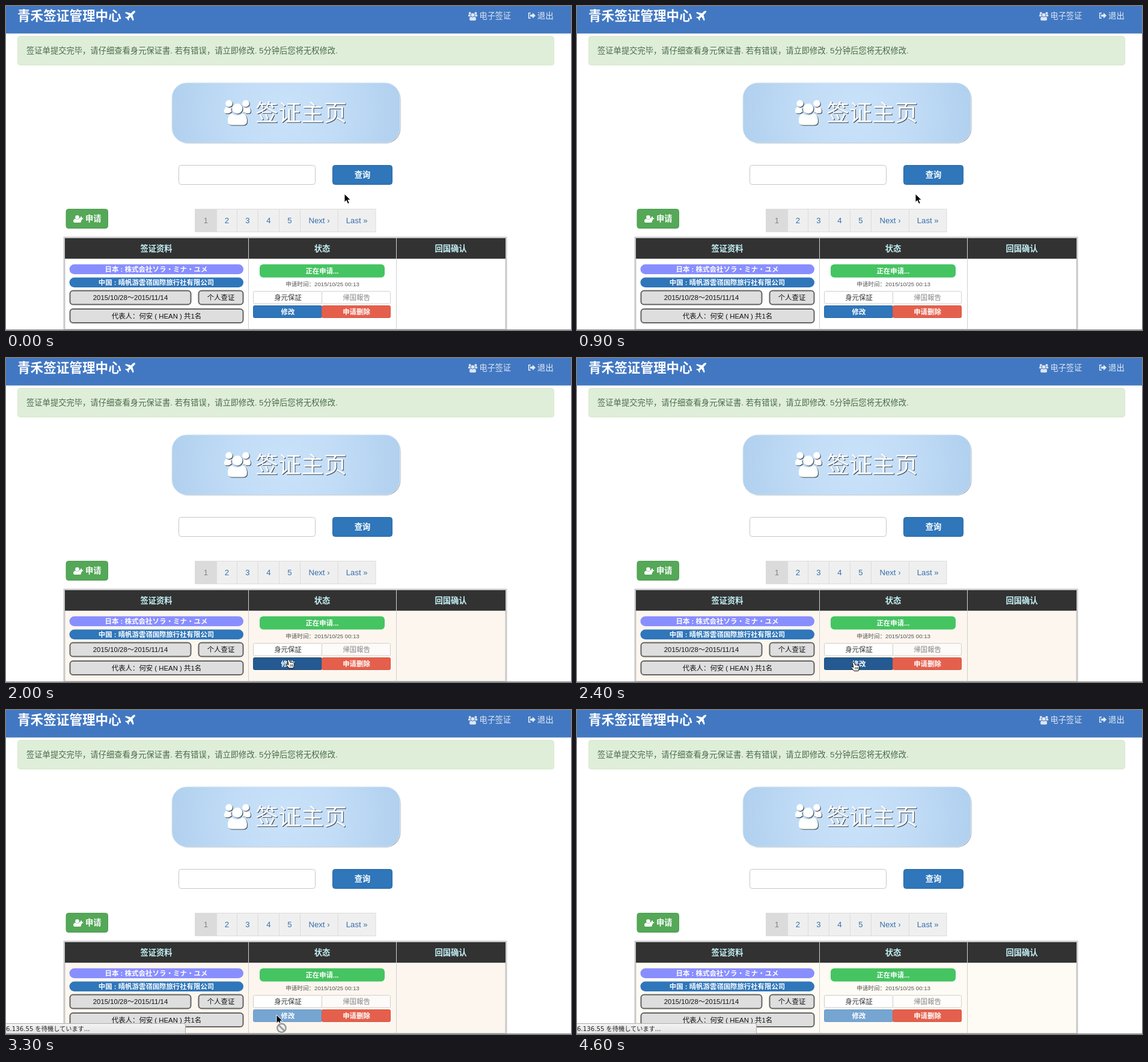
These frames come from a looping animation (940x540 px, 4.7 s). An HTML page:

```html
<!DOCTYPE html>
<html lang="zh">
<head>
<meta charset="utf-8">
<title>签证管理中心</title>
<style>
  html, body { margin: 0; width: 100%; height: 100%; overflow: hidden; background: #fff; }
  svg { display: block; width: 940px; height: 540px; }
  text { font-family: "Liberation Sans", "Noto Sans CJK SC", "Noto Sans CJK JP", "Noto Sans CJK", sans-serif; white-space: pre; }
  .jp { font-family: "Liberation Sans", "Noto Sans CJK JP", "Noto Sans CJK", sans-serif; }
  .mono { font-family: "DejaVu Sans", "Noto Sans CJK JP", "Noto Sans CJK", sans-serif; }
  .raised { filter: drop-shadow(1.5px 1.5px .7px #3c444d); }
</style>
</head>
<body>
<svg id="stage" viewBox="0 0 940 540" xmlns="http://www.w3.org/2000/svg">
  <defs>
    <radialGradient id="sky" gradientUnits="userSpaceOnUse" cx="465.500" cy="178" r="196">
      <stop offset="0" stop-color="#c9e2fa"/>
      <stop offset=".4" stop-color="#c3ddf7"/>
      <stop offset="1" stop-color="#b0d0ee"/>
    </radialGradient>
    <linearGradient id="bar" x2="0" y2="1">
      <stop offset="0" stop-color="#f4f4f4"/>
      <stop offset="1" stop-color="#e2e2e2"/>
    </linearGradient>
    <g id="users">
      <circle cx="8" cy="7" r="5.800"/>
      <circle cx="36" cy="7" r="5.800"/>
      <path d="M4 13C1 13 0 17 0 20Q0 23.500 4 23.500H8Q10 21.500 12.500 21Q11 17 11.800 14Q8 16 4 13Z"/>
      <path d="M40 13C43 13 44 17 44 20Q44 23.500 40 23.500H36Q34 21.500 31.500 21Q33 17 32.200 14Q36 16 40 13Z"/>
      <circle cx="22" cy="15.500" r="8.500"/>
      <path d="M13.500 24C7.500 24 6 31 6 36Q6 43 12.500 43H31.500Q38 43 38 36C38 31 36.500 24 30.500 24Q22 30 13.500 24Z"/>
    </g>
    <path id="plane" d="M17 .4C15.500 -.4 13.600 .5 12.300 1.800L9.900 4.200L1.600 2L0 3.600L6.700 7.400L3.600 10.600L1.200 10.100L.2 11.100L3.500 13.100L5.600 16.500L6.600 15.500L6.100 13.100L9.300 10L13.100 16.700L14.700 15.100L12.500 6.800L14.900 4.400C16.200 3.100 17.500 1.500 17 .4Z"/>
  </defs>
  <g id="page"></g>
  <g id="status">
    <path d="M-1 522.500H296Q298.500 522.500 298.500 525V541H-1Z" fill="url(#bar)" stroke="#adadad"/>
    <text id="statusText" class="mono" x="0" y="534.500" font-size="10.200" fill="#222"></text>
  </g>
  <g id="cursor">
    <path id="arrow" d="M0 0V14.200L3.300 11.200L5.700 16.700L8.300 15.600L5.900 10.200H10.300Z" fill="#000" stroke="#fff" stroke-width="1"/>
    <g id="hand" stroke="#000" stroke-width="1" stroke-linejoin="round">
      <path d="M-1.500 1Q0 -1 1.500 1L3 5Q4.500 3.800 5.500 5.200Q7 4.200 8 5.700Q9.600 5.200 9.800 7L9.500 11L8 14.500H1L-2 11L-4 8.500Q-3.800 6.500 -1.500 8L-.2 9Z" fill="#fff"/>
      <path d="M3 8V12M5.300 8V12M7.400 8V12" fill="none" stroke-width=".8"/>
    </g>
    <g id="blocked" fill="none">
      <circle cx="8.500" cy="22" r="7.300" stroke="#fff" stroke-width="4.500"/>
      <circle cx="8.500" cy="22" r="7.200" fill="#f2f0ee" stroke="#999" stroke-width="2.500"/>
      <path d="M3.500 17L13.500 27" stroke="#999" stroke-width="2.500"/>
    </g>
  </g>
  <path d="M0 539.500H940" stroke="#8c8c8c"/>
</svg>
<script>
const $ = id => document.getElementById(id);
const parts = [];

const box = (x, y, w, h, fill, stroke = 'none', r = 0, extra = '') =>
  parts.push(`<rect x="${x}" y="${y}" width="${w}" height="${h}" rx="${r}" fill="${fill}" stroke="${stroke}" ${extra}/>`);

// Text is placed by the vertical middle of its line.
const label = (str, x, mid, size, fill, opt = '') =>
  parts.push(`<text x="${x}" y="${mid + size * .37}" font-size="${size}" fill="${fill}" ${opt}>${str}</text>`);
const MID = 'text-anchor="middle"';
const BOLD = 'font-weight="bold"';
const MIDBOLD = `${MID} ${BOLD}`;

const icon = (id, x, y, scale, fill, opt = '') =>
  parts.push(`<use href="#${id}" transform="translate(${x} ${y}) scale(${scale})" fill="${fill}" ${opt}/>`);
const line = (d, stroke, width = 1) =>
  parts.push(`<path d="${d}" fill="none" stroke="${stroke}" stroke-width="${width}"/>`);

function header() {
  box(0, 0, 940, 45, '#4278c2');
  line('M0 45.500H940', '#6c94ca');
  label('青禾签证管理中心', 19, 16, 21.6, '#fff', BOLD);
  icon('plane', 198, 8, 1, '#fff');
  icon('users', 769, 9.5, .345, '#dfe7f3');
  label('电子签证', 787.5, 16, 13.2, '#dfe7f3');
  line('M873 11.700H869.700V20.300H873', '#e6edf6', 1.5);
  parts.push('<path d="M872 14.300H876V11.300L881 16L876 20.700V17.700H872Z" fill="#e6edf6"/>');
  label('退出', 884, 16, 13.4, '#e6edf6');
  box(19.5, 50.5, 892, 48, '#dfeed9', '#d5e8c8', 4);
  label('签证单提交完毕，请仔细查看身元保证書. 若有错误，请立即修改. 5分钟后您将无权修改.', 34, 74, 13.3, '#4b6b4d');
}

function banner() {
  box(277.5, 129.5, 379, 99.5, '#9a9fa8', 'none', 25, 'style="filter:blur(.7px)"');
  box(276, 128, 379.5, 100, 'url(#sky)', '#dce9f6', 25);
  icon('users', 363, 155.5, 1, '#fff', 'class="raised"');
  label('签证主页', 415, 177, 38, '#fff', 'class="raised" font-weight="500"');
}

function search() {
  box(287.5, 265.5, 227, 32, '#fff', '#c6c6c6', 4);
  box(543.5, 265.5, 99, 32, '#2f76ba', '#2a68a6', 4);
  label('查询', 593, 281.5, 13.3, '#fff', MIDBOLD);
  box(100, 338.5, 69.5, 32, '#54a857', '#4c9c4f', 4);
  parts.push('<g fill="#fff"><circle cx="118.500" cy="352" r="3.300"/><path d="M115.500 354.500Q112 355 112 359Q112 361 114 361H123Q125 361 125 359Q125 355 121.500 354.500Q118.500 357 115.500 354.500Z"/></g>');
  line('M125 351V357.500M121.800 354.200H128.200', '#fff', 2);
  label('申请', 132, 354.5, 13.3, '#fff', BOLD);
}

function pager() {
  const edges = [314.5, 350.5, 384.5, 419.5, 454.5, 489.5, 552.5, 615];
  ['1', '2', '3', '4', '5', 'Next ›', 'Last »'].forEach((str, i) => {
    const x = edges[i], w = edges[i + 1] - x;
    box(x, 338.5, w, 38, i ? '#efefef' : '#dbdbdb', '#dcdcdc');
    label(str, x + w / 2, 357.5, 13.2, i ? '#376fae' : '#858585', MID);
  });
}

function table() {
  box(97, 386, 735, 170, '#fff', '#c9c9c9', 0, 'stroke-width="3" id="row"');
  box(98, 387, 733, 34, '#323232');
  line('M98 421.500H831M403.500 387V540M649.500 387V540M98 538.500H831', '#cfcfcf');
  label('签证资料', 250, 404, 13.3, '#c4f1f5', MIDBOLD);
  label('状态', 526, 404, 13.3, '#c4f1f5', MIDBOLD);
  label('回国确认', 740, 404, 13.3, '#c4f1f5', MIDBOLD);

  box(105.5, 430.5, 289.5, 16.5, '#898eff', 'none', 8.2);
  label('日本 : 株式会社ソラ・ミナ・ユメ', 250, 438.5, 11.5, '#fff', MIDBOLD);
  box(105.5, 452.5, 289.5, 16.5, '#2f76ba', 'none', 8.2);
  label('中国 : 晴帆游雲嶺国際旅行社有限公司', 250, 460.5, 11.4, '#fff', MIDBOLD);
  const grey = (x, y, w, str) => {
    box(x, y, w, 23, '#dedede', '#636363', 5, 'stroke-width="2"');
    label(str, x + w / 2, y + 11.5, 11.4, '#111', `${MID} class="jp"`);
  };
  grey(106.5, 474.5, 201, '2015/10/28～2015/11/14');
  grey(320.5, 474.5, 74, '个人查证');
  grey(106.5, 505, 288, '代表人：何安 ( HEAN ) 共1名');

  box(422, 430.5, 208, 22, '#45c462', 'none', 6);
  label('正在申请...', 526, 441.5, 11.4, '#fff', MIDBOLD);
  label('申请时间：2015/10/25 00:13', 526.5, 463.5, 9.6, '#555', `${MID} class="jp"`);
  const faded = 'opacity=".65"';
  box(525.5, 475.5, 114, 20.5, '#fff', '#bbb', 2, faded);
  box(411.5, 475.5, 114, 20.5, '#fff', '#ccc', 2);
  label('身元保証', 469, 485.5, 11.4, '#333', MID);
  label('帰国報告', 583, 485.5, 11.4, '#444', `${MID} ${faded}`);
  box(411.5, 499.5, 114, 20, '#2f76ba', '#2b69a5', 2, 'id="edit"');
  box(525.5, 499.5, 114, 20, '#e4604d', '#d65643', 2);
  label('修改', 469, 509.5, 11.4, '#fff', MIDBOLD);
  label('申请删除', 583, 509.5, 11.4, '#fff', MIDBOLD);
}

[header, banner, search, pager, table].forEach(draw => draw());
$('page').innerHTML = parts.join('');

const LOOP = 4700, TICK = 100;
// time, x, y of the pointer tip
const path = [
  [0, 563, 313], [1100, 563, 313], [1200, 549, 324], [1300, 524, 358],
  [1400, 495.5, 432.5], [1600, 479, 482], [1800, 470, 502.5], [2200, 470, 502.5],
  [2600, 450, 511.5], [2900, 450, 511.5], [3100, 450, 508], [3900, 450, 508],
  [4200, 446, 548], [4700, 446, 548]
];
// Each table holds its value until the next time.
const pointer = [[0, 'arrow'], [1700, 'hand'], [3100, 'blocked']];
const editFill = [[0, '#2f76ba'], [1700, '#245a91'], [3100, '#76a5d2']];
const editEdge = [[0, '#2b69a5'], [1700, '#1f4d7c'], [3100, '#6c9bc9']];
const rowFill = [[0, '#fff'], [1500, '#fefaf5'], [1600, '#fcf6ef'], [4200, '#fefbf4']];
const LINK = '6.136.55/projects/index?page=2';
const WAIT = '6.136.55 を待機しています...';
const statusBar = [[0, ['', 0]], [1300, [LINK, 1]], [1400, [LINK, .14]], [1500, ['', 0]], [3100, [WAIT, 1]]];

const held = (steps, t) => steps.filter(s => s[0] <= t).pop()[1];

function along(t) {
  const i = path.findIndex(p => p[0] > t);
  const [t0, x0, y0] = path[i - 1], [t1, x1, y1] = path[i];
  const k = (t - t0) / (t1 - t0);
  return [x0 + (x1 - x0) * k, y0 + (y1 - y0) * k];
}

const show = (id, on) => { $(id).style.display = on ? '' : 'none'; };

function render(now) {
  const t = Math.floor((now % LOOP) / TICK) * TICK;
  const [x, y] = along(t);
  const kind = held(pointer, t);
  $('cursor').setAttribute('transform', `translate(${x} ${y})`);
  show('arrow', kind !== 'hand');
  show('hand', kind === 'hand');
  show('blocked', kind === 'blocked');
  $('edit').setAttribute('fill', held(editFill, t));
  $('edit').setAttribute('stroke', held(editEdge, t));
  $('row').setAttribute('fill', held(rowFill, t));
  const [str, alpha] = held(statusBar, t);
  $('statusText').textContent = str;
  $('status').setAttribute('opacity', alpha);
}

const start = performance.now();
function loop() {
  render(performance.now() - start);
  requestAnimationFrame(loop);
}
loop();
</script>
</body>
</html>
```
